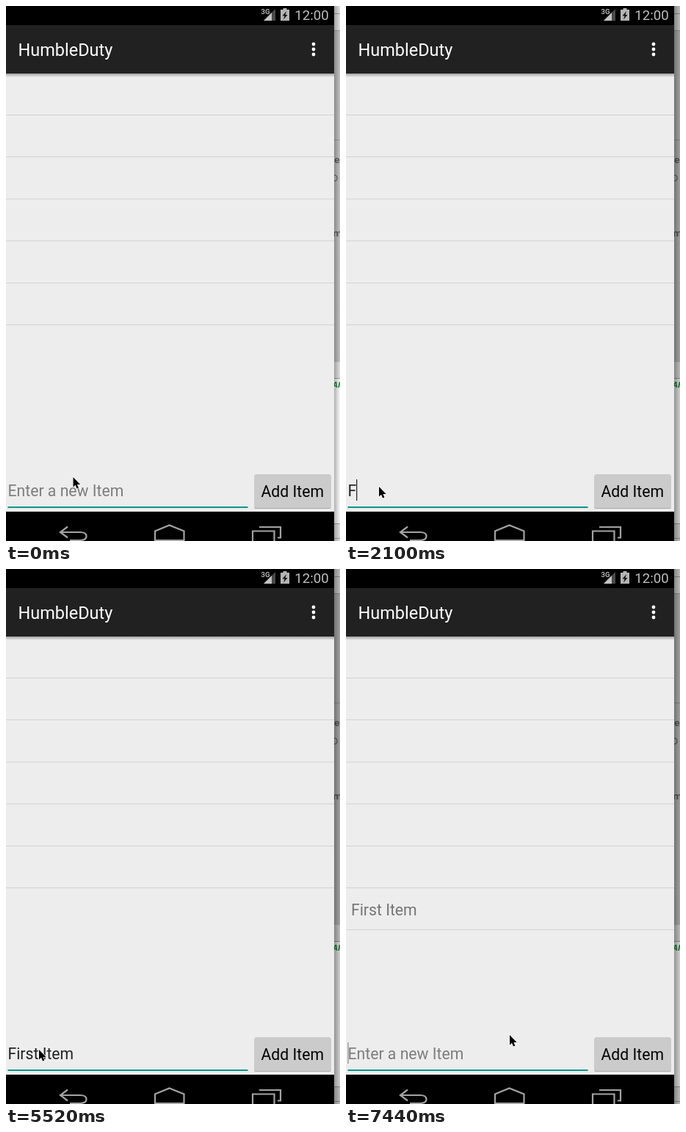
Animation of 455x729 px, one loop 8 s. Source, as an HTML page:

```html
<!DOCTYPE html>
<html lang="en">
<head>
<meta charset="utf-8">
<title>To-do list</title>
<style>
  html, body { margin: 0; width: 100%; height: 100%; overflow: hidden; background: #ededed; }
  svg { position: absolute; left: 0; top: 0; width: 455px; height: 729px; display: block; }
  text { font-family: Roboto, "Noto Sans", sans-serif; white-space: pre; }
  .body { font-size: 21.2px; }
  .side { font: bold 13px "Open Sans", sans-serif; fill: #626262; }
  .nav { fill: none; stroke: #a3a3a3; stroke-width: 2.2; }
</style>
</head>
<body>
<svg viewBox="0 0 455 729">
  <defs>
    <linearGradient id="shade">
      <stop offset="0" stop-color="#000" stop-opacity=".3"/>
      <stop offset="1" stop-color="#000" stop-opacity=".03"/>
    </linearGradient>
    <linearGradient id="drop" x2="0" y2="1">
      <stop offset="0" stop-color="#000" stop-opacity=".32"/>
      <stop offset="1" stop-color="#000" stop-opacity="0"/>
    </linearGradient>
  </defs>

  <!-- window behind -->
  <g>
    <rect x="440" width="15" height="729" fill="#e6e6e6"/>
    <rect x="440" y="34" width="15" height="451" fill="#c6c6c6"/>
    <rect x="440" y="508" width="15" height="197" fill="#fff"/>
    <path d="M440 10.5h15M440 33.5h15M440 182.5h15M440 507.5h15M440 705.5h15M440 725.5h15" stroke="#a2a2a2"/>
    <text class="side" x="447" y="214">e</text>
    <text class="side" x="443" y="239" style="font-weight:400">D</text>
    <text class="side" x="445" y="314">m</text>
    <text x="445" y="520" style="font:italic bold 11px 'Open Sans',sans-serif" fill="#188a38">AI</text>
    <rect x="447" width="8" height="729" fill="url(#shade)"/>
    <rect id="dim" x="447" width="8" height="729" fill="#000" opacity=".17"/>
  </g>

  <!-- phone -->
  <rect width="447" height="729" fill="#ededed"/>
  <rect width="447" height="26" fill="#000"/>
  <rect y="26" width="447" height="66" fill="#212121"/>
  <rect y="92" width="447" height="5" fill="url(#drop)"/>
  <rect y="689" width="447" height="40" fill="#000"/>

  <text x="347.5" y="11" font-size="9.5" font-weight="500" fill="#d0d0d0">3G</text>
  <path d="M351 20L367 4V20Z" fill="#4a4a4a"/>
  <path d="M351 20L362 9V20Z" fill="#c4c4c4"/>
  <path d="M377.5 3h5v2h3.500v15h-12v-15h3.500Z" fill="#b4b4b4"/>
  <path d="M382 7l-5.500 6.500h3l-1.500 5 5.500-6.500h-3Z" fill="#111"/>
  <text x="393.300" y="19" font-size="18.600" fill="#bdbdbd">12:00</text>

  <text x="16.500" y="68" font-size="23.500" fill="#fff">HumbleDuty</text>
  <g fill="#fff">
    <circle cx="419" cy="52" r="2.400"/>
    <circle cx="419" cy="59" r="2.400"/>
    <circle cx="419" cy="66" r="2.400"/>
  </g>

  <path d="M0 148.500h447M0 205.500h447M0 263h447M0 320h447M0 377.500h447M0 434.500h447" stroke="#d1d1d1"/>
  <g id="item">
    <text class="body" x="7" y="471.500" fill="#757575">First Item</text>
    <path d="M0 491.500h447" stroke="#d1d1d1"/>
  </g>

  <text id="hint" class="body" x="2.500" y="668" fill="#7d7d7d">Enter a new Item</text>
  <text id="typed" class="body" x="2.500" y="668" fill="#222"></text>
  <rect id="caret" y="645" width="1.200" height="29"/>
  <path d="M2.500 683H329.500" stroke="#009688" stroke-width="2"/>

  <rect x="338.500" y="639" width="104" height="46" rx="1.500" fill="#aaa"/>
  <rect id="button" x="339" y="638" width="103" height="46" rx="1.500"/>
  <text class="body" x="390.300" y="669" text-anchor="middle">Add Item</text>

  <g class="nav">
    <path d="M84 709.500L74 717L84 724.500M75 717H101Q109.500 717 109.500 722.500T101 728H87"/>
    <path d="M203 728V715.500L222.500 707.500L242.500 715.500V728Z"/>
    <path d="M336 715.500H365.500V731H336ZM345 710H374V724.500H370"/>
  </g>

  <path id="pointer" d="M0 0V13.500L3 10.800L5 15.500L7.400 14.500L5.400 9.900H9.700Z" stroke="#fff" stroke-width="1.200" paint-order="stroke"/>
</svg>
<script>
const LOOP = 8000;
const $ = id => document.getElementById(id);
const [dim, item, hint, typed, caret, button, pointer] =
  ["dim", "item", "hint", "typed", "caret", "button", "pointer"].map($);

// Each track holds [start, value] pairs; a value lasts until the next start.
const pointerTrack = [
  [0, [91.5, 642]], [450, [82, 645]], [600, [58, 652]], [750, [45, 655]],
  [5670, [88, 634]], [5820, [184, 606]], [5960, [431, 653]], [6110, [420, 660]],
  [6850, [345, 640]], [7000, [262, 627]], [7150, [223, 635]]
];
const lengthTrack = [
  [0, 0], [2100, 1], [2250, 2], [2550, 3], [3140, 4], [3290, 5],
  [3880, 6], [4330, 7], [4620, 8], [4770, 9], [5070, 10], [6550, 0]
];
// Times at which the caret toggles, starting hidden.
const blinks = [150, 600, 1050, 1650, 2100, 2990, 3140, 5520, 6110, 7000, 7440];

const at = (track, t) => track.findLast(([start]) => start <= t)[1];
const show = (el, on) => el.setAttribute("visibility", on ? "visible" : "hidden");

function draw(t) {
  const [x, y] = at(pointerTrack, t);
  const text = "First Item".slice(0, at(lengthTrack, t));
  pointer.setAttribute("transform", `translate(${x} ${y})`);
  if (typed.textContent !== text) typed.textContent = text;
  caret.setAttribute("x", 2.3 + (text ? typed.getComputedTextLength() : 0));
  caret.setAttribute("fill", text ? "#222" : "#8a8a8a");
  show(caret, blinks.filter(b => b <= t).length % 2);
  show(hint, !text);
  show(item, t >= 6550);
  show(dim, t >= 1050);
  button.setAttribute("fill", t >= 6400 && t < 6550 ? "#bdbdbd" : "#cbcbcb");
}

const begin = performance.now();
function tick() {
  draw((performance.now() - begin) % LOOP);
  requestAnimationFrame(tick);
}
tick();
</script>
</body>
</html>
```
